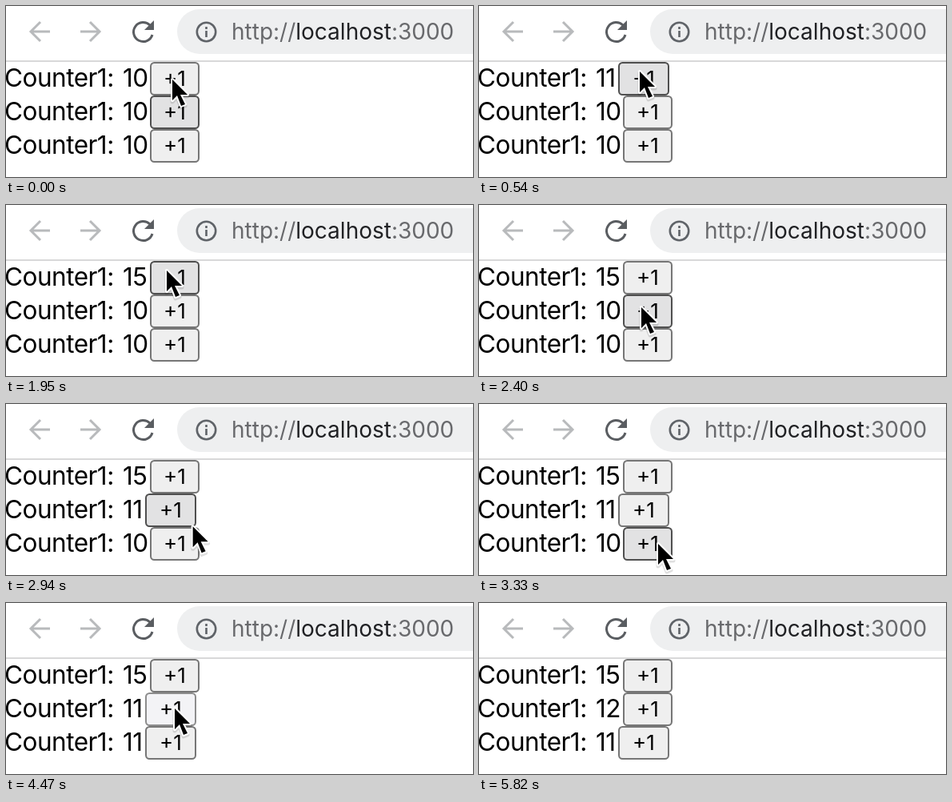
Write an HTML page that moves like this. It is 584 px wide and 214 px high and loops after 6330 ms.

```html
<!DOCTYPE html>
<html lang="en">
<head>
<meta charset="utf-8">
<title>Counters</title>
<style>
  html, body { margin: 0; height: 100%; overflow: hidden; background: #fff; }
  svg { display: block; font-family: Inter, Roboto, sans-serif; }
  .row { font-size: 31.5px; letter-spacing: -.5px; }
  .url { font-size: 28px; fill: #68696c; }
  .btn rect { fill: #efefef; stroke: #767676; stroke-width: 2; }
  .btn text { font-size: 26px; text-anchor: middle; }
  .hover rect { fill: #e2e2e3; stroke: #4f4f4f; }
  .active rect { fill: #f3f3f6; stroke: #8d8d8d; }
</style>
</head>
<body>
<svg width="584" height="214">
  <defs>
    <path id="arrow" d="M55 32H31M43 20L31 32L43 44"/>
    <path id="pointer" d="M0 0V26L6 20L11 33L16 31L10 19H19Z"/>
  </defs>
  <g fill="none" stroke="#b8babc" stroke-width="3">
    <use href="#arrow"/>
    <use href="#arrow" transform="translate(148) scale(-1 1)"/>
    <path stroke="#5a5d61" d="M180 24A12 12 0 1 0 183 36"/>
    <circle stroke="#5f6368" cx="250.5" cy="32.5" r="12"/>
  </g>
  <path fill="#5a5d61" d="M173 30H185V18Z"/>
  <rect id="bar" x="214" y="4" width="420" height="56" rx="28" fill="#eeeff0"/>
  <g fill="none" stroke="#5f6368" stroke-width="2.6">
    <circle cx="250.5" cy="32.5" r="11.7"/>
    <path d="M250.5 31V39M250.5 26V29"/>
  </g>
  <text class="url" x="282" y="42">http://<tspan fill="#202124">localhost</tspan>:3000</text>
  <rect y="68" width="584" height="2" fill="#d8d8d9"/>
  <g id="rows"></g>
  <g id="cursor" stroke-linejoin="round">
    <use href="#pointer" y="2" stroke="#000" stroke-width="5" opacity=".12"/>
    <use href="#pointer" stroke="#fff" stroke-width="4"/>
    <use href="#pointer"/>
  </g>
</svg>
<script>
const LOOP = 6330, TICK = 30, HIDE = 4980, TOP = 70, PITCH = 42;

// row, press time, release time
const clicks = [
  [0, 450, 540], [0, 900, 1050], [0, 1230, 1380], [0, 1560, 1710],
  [0, 1830, 1950], [1, 2550, 2640], [2, 3720, 3840], [1, 4470, 4560]
];

// start, duration, goal x and y, bend x and y
const moves = [
  [0, 390, 201, 82, -120, -142],
  [2220, 180, 203, 128, 0, 0],
  [2820, 510, 224, 175, 115, 78],
  [4110, 330, 211, 132, 0, 0],
  [4860, 90, 229, 164, 0, 0]
];

const rows = document.getElementById('rows');
const cursor = document.getElementById('cursor');
rows.innerHTML = `<g><text class="row" x="-2" y="30.5">Counter1:</text>
  <text class="row value" x="146" y="30.5"></text>
  <g class="btn"><rect y="1" height="40" rx="4.5"/><text y="30">+1</text></g></g>`.repeat(3);
const values = rows.querySelectorAll('.value');
const buttons = rows.querySelectorAll('.btn');
[...rows.children].forEach((row, i) =>
  row.setAttribute('transform', `translate(0 ${TOP + PITCH * i})`));

function cursorAt(t) {
  let x = 208, y = 92;
  for (const [start, span, toX, toY, bendX, bendY] of moves) {
    const p = Math.min(1, Math.max(0, (t - start) / span));
    const s = p * p * (3 - 2 * p), bow = 2 * s * (1 - s);
    x += (toX - x) * s + bendX * bow;
    y += (toY - y) * s + bendY * bow;
  }
  return [x, y];
}

function hoveredRow(t, [x, y]) {
  if (t < 2 * TICK) return 1;  // the highlight lags behind the pointer
  return t < HIDE - TICK && x > 174 && x < 242 ? Math.floor((y - TOP) / PITCH) : -1;
}

function draw(t) {
  const tip = cursorAt(t), hover = hoveredRow(t, tip);
  buttons.forEach((button, i) => {
    const own = clicks.filter(c => c[0] === i);
    const count = 10 + own.filter(c => c[2] <= t).length;
    const pressed = own.some(c => c[1] <= t && t < c[2]);
    const [x, width] = count === 11 ? [174, 64] : [180, 62];
    const [rect, label] = button.children;
    values[i].textContent = count;
    rect.setAttribute('x', x + 1);
    rect.setAttribute('width', width - 2);
    label.setAttribute('x', x + width / 2);
    button.setAttribute('class', 'btn ' + (pressed ? 'active' : hover === i ? 'hover' : ''));
  });
  cursor.setAttribute('transform', `translate(${tip})`);
  cursor.setAttribute('visibility', t < HIDE ? 'visible' : 'hidden');
}

const begin = performance.now();
function frame() {
  const t = (performance.now() - begin) % LOOP;
  draw(Math.floor(t / TICK) * TICK);
  requestAnimationFrame(frame);
}
frame();
</script>
</body>
</html>
```
